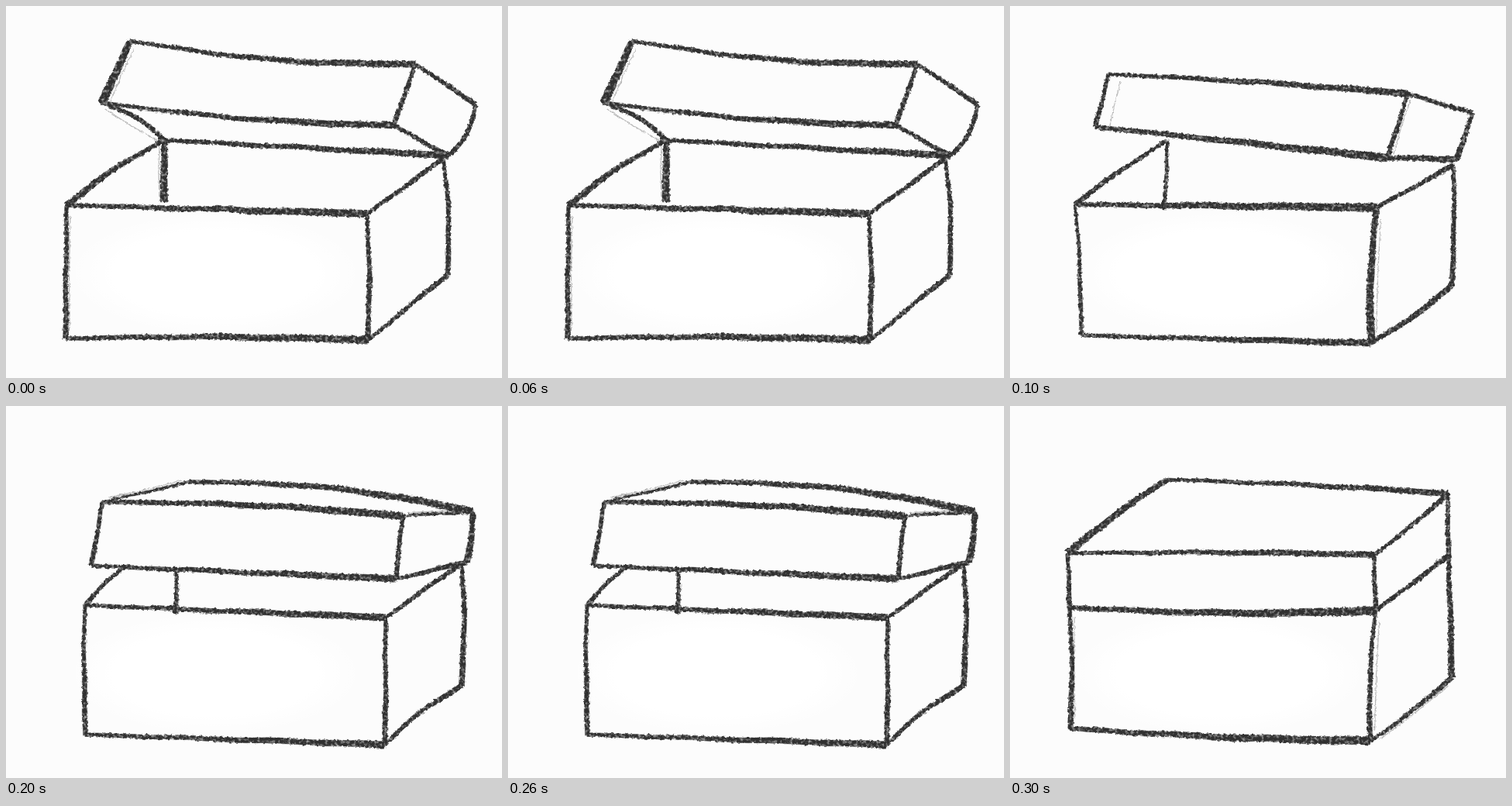
An HTML page for the animation above (400 ms loop, 640 by 480 pixels).

```html
<!DOCTYPE html>
<html lang="en">
<head>
<meta charset="utf-8">
<title>Closing box</title>
<style>
html, body { margin: 0; width: 100%; height: 100%; overflow: hidden; background: #fcfcfc; }
svg { display: block; width: 100vw; height: 100vh; }
</style>
</head>
<body>
<svg id="stage" viewBox="0 0 640 480">
  <defs>
    <radialGradient id="white"><stop offset=".7" stop-color="#fff"/><stop offset="1" stop-color="#fff" stop-opacity="0"/></radialGradient>
    <filter id="charcoal" filterUnits="userSpaceOnUse" x="0" y="0" width="640" height="480" color-interpolation-filters="sRGB">
      <feTurbulence type="fractalNoise" baseFrequency=".25" numOctaves="3" seed="4" result="noise"/>
      <feDisplacementMap in="SourceGraphic" in2="noise" scale="4" xChannelSelector="R" yChannelSelector="G" result="rough"/>
      <feColorMatrix in="noise" values="0 0 0 0 0  0 0 0 0 0  0 0 0 0 0  0 0 1.5 0 .2" result="grain"/>
      <feComposite in="rough" in2="grain" operator="in"/>
      <feGaussianBlur stdDeviation=".45"/>
    </filter>
  </defs>
  <rect width="640" height="480" fill="#fcfcfc"/>
  <ellipse cx="270" cy="345" rx="190" ry="80" fill="url(#white)"/>
</svg>
<script>
const stage = document.getElementById('stage');
const STEP = 100;

// Corners: a-d rim, e-g floor, n-i inner corner, p-u lid, k back of the lid
const BODY = 'ab bc ae bf ef fg cg da ni ';
const LID = 'pq pr rt tu rs su qs ';

// bow bends an edge, press scales its weight, faint adds a pencil line beside it
const POSES = [
  {
    edges: BODY + LID + 'qd du',
    at: {
      a: [78, 257], b: [466, 268], c: [564, 197], d: [204, 173], n: [204, 173], i: [204, 253],
      e: [77, 429], f: [467, 431], g: [570, 347],
      p: [160, 45], q: [124, 125], r: [528, 75], s: [500, 154], t: [606, 127], u: [571, 193]
    },
    bow: { pr: 9, qs: 6, tu: -7, qd: -6, da: 4, ef: -3, cg: -4, bf: -2 },
    press: { pq: 1.8, ni: 1.6, da: 1.2, ef: 1.1, ab: 1.1 },
    faint: { pq: -9, ni: 6, qd: 5, ae: -5 }
  },
  {
    edges: BODY + LID,
    at: {
      a: [84, 256], b: [473, 260], c: [572, 205], d: [203, 173], n: [203, 173], i: [199, 263],
      e: [92, 425], f: [466, 435], g: [570, 361],
      p: [127, 88], q: [110, 156], r: [513, 113], s: [487, 196], t: [597, 138], u: [576, 198]
    },
    bow: { pr: -2, bf: 4, fg: 3, da: 2, ae: -2, cg: -2 },
    press: { qs: 1.2, ab: 1.2, su: 1.3, tu: 1.2, bf: 1.5, fg: 1.2, ae: 0.8, ni: 0.8 },
    faint: { pq: -18, rs: -6, bf: -6 }
  },
  {
    edges: BODY + LID + 'pk kt',
    at: {
      a: [102, 257], b: [490, 273], c: [588, 203], d: [155, 206], n: [220, 213], i: [219, 268],
      e: [103, 424], f: [489, 437], g: [588, 361],
      p: [124, 124], q: [110, 206], r: [512, 142], s: [503, 223], t: [602, 136], u: [594, 202], k: [236, 98]
    },
    bow: { pr: -5, kt: -11, tu: -3, fg: -5, cg: -3, ae: 2, da: 2 },
    press: { tu: 1.4, pr: 1.1, kt: 1.1, cg: 1.1, pk: 0.6, rt: 0.7 },
    faint: { pk: -4, rt: -4 }
  },
  {
    edges: 'kp kt pr rt pa rb tc ab bc ae bf ef fg cg',
    at: {
      a: [77, 260], b: [472, 264], c: [566, 193], e: [78, 416], f: [465, 432], g: [570, 350],
      p: [74, 190], r: [470, 192], t: [565, 113], k: [203, 95]
    },
    bow: { ab: 5, bf: 4, ef: 3, fg: 3, kp: 3, rt: 2, kt: -2, pr: -2, ae: -2 },
    press: { ab: 1.25, kp: 1.4, ef: 1.25, cg: 1.2, pr: 0.9, kt: 0.9 },
    faint: { ae: -6, bf: -5, fg: 6 }
  }
];

let seed = 7;
const rand = () => (seed = (seed * 16807) % 2147483647) / 2147483647;

function add(parent, tag, attrs) {
  const el = document.createElementNS('http://www.w3.org/2000/svg', tag);
  for (const k in attrs) el.setAttribute(k, attrs[k]);
  return parent.appendChild(el);
}

const toPath = pts => 'M' + pts.map(p => p.map(v => v.toFixed(1)).join(' ')).join('L');

// Point at share k of the edge, moved sideways by off(k)
function edge([x0, y0], [x1, y1]) {
  const dx = x1 - x0, dy = y1 - y0, len = Math.hypot(dx, dy);
  const point = (k, off) => [x0 + dx * k - dy / len * off, y0 + dy * k + dx / len * off];
  return { len, point };
}

// The hand presses harder toward the end of a stroke, most on long ones
function ink(g, from, to, bow, press) {
  const { len, point } = edge(from, to);
  const phase = rand() * 6, steps = Math.ceil(len / 4);
  const left = [], right = [];
  for (let s = 0; s <= steps; s++) {
    const k = s / steps;
    const mid = Math.sin(Math.PI * k) * (bow + 0.7 * Math.sin(k * len / 18 + phase));
    const half = press * (4.5 + k * (1 + len / 130)) / 2;
    left.push(point(k, mid + half + (rand() - 0.5) * 0.6));
    right.unshift(point(k, mid - half - (rand() - 0.5) * 0.6));
  }
  add(g, 'path', { d: toPath(left.concat(right)) + 'Z', fill: '#303030', stroke: '#303030', 'stroke-width': 0.5, 'stroke-linejoin': 'round' });
}

function pencil(g, from, to, off) {
  const { point } = edge(from, to);
  add(g, 'path', { d: toPath([point(0.08, off), point(0.5, off + 1), point(0.92, off)]), fill: 'none', stroke: '#888', 'stroke-opacity': 0.6, 'stroke-width': 1.3 });
}

function draw({ edges, at, bow, press, faint }) {
  const g = add(stage, 'g', { filter: 'url(#charcoal)', display: 'none' });
  for (const id of edges.trim().split(' ')) {
    const from = at[id[0]], to = at[id[1]];
    if (id in faint) pencil(g, from, to, faint[id]);
    ink(g, from, to, bow[id] || 0, press[id] || 1);
  }
  return g;
}

const drawings = POSES.map(draw);
const start = performance.now();

function render(ms) {
  const now = Math.floor(ms / STEP) % drawings.length;
  drawings.forEach((g, i) => g.setAttribute('display', i === now ? 'inline' : 'none'));
}

function tick() {
  render(performance.now() - start);
  requestAnimationFrame(tick);
}
tick();
</script>
</body>
</html>
```
